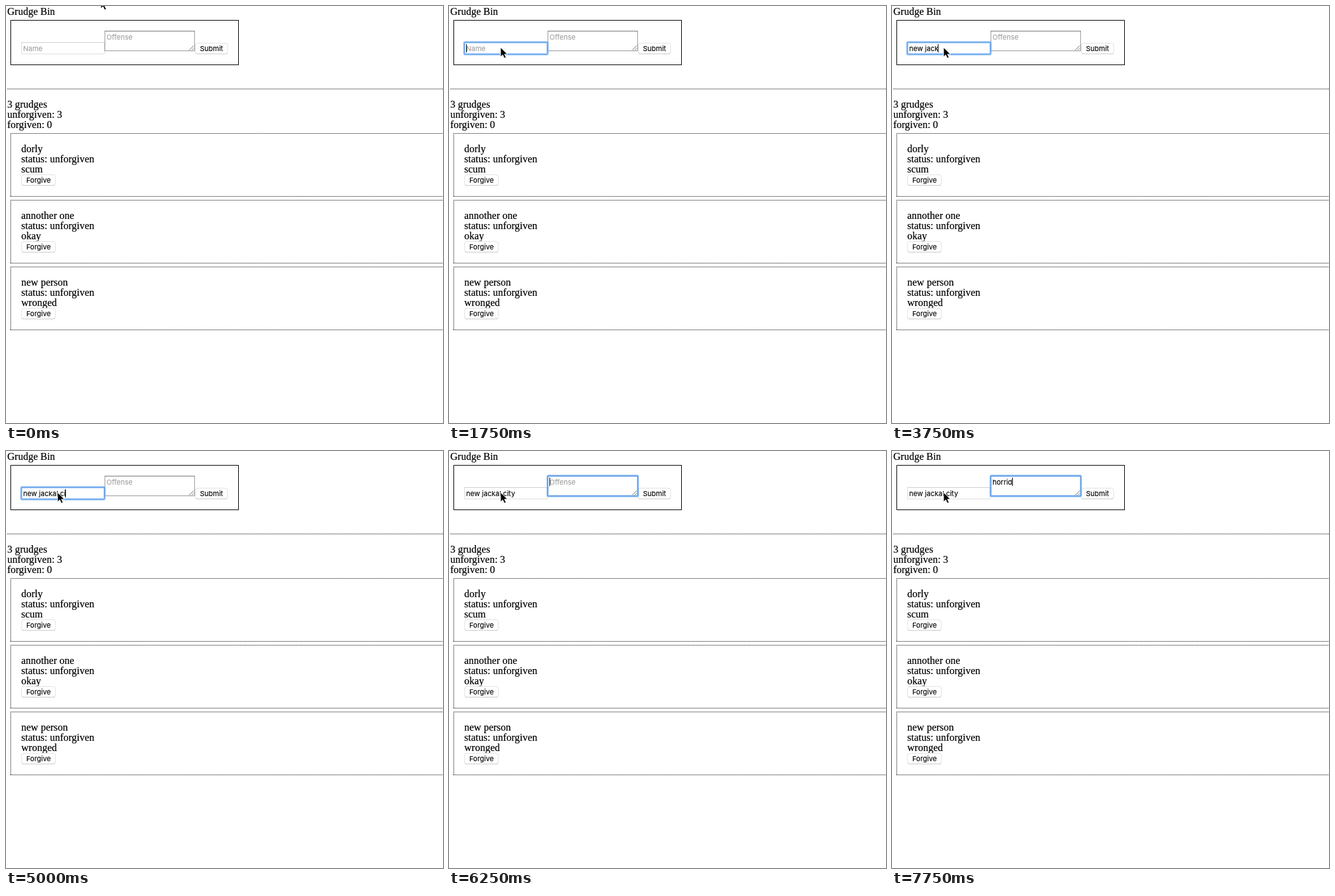
Animation, 687 px wide and 656 px high, one loop 8 s. Source, as an HTML page:

```html
<!DOCTYPE html>
<html lang="en">
<head>
<meta charset="utf-8">
<title>Grudge Bin</title>
<style>
  html, body { margin: 0; width: 100%; height: 100%; overflow: hidden; background: #fff; }
  svg { display: block; }
  text { font: 16px "Liberation Serif", Times, serif; white-space: pre; stroke: #000; stroke-width: .2px; }
  .ui { font: 11px Inter, "Liberation Sans", sans-serif; stroke-width: .1px; }
  .hint { fill: #a0a0a0; stroke: #a0a0a0; }
  .line { fill: none; stroke: #000; }
  .dots { stroke-dasharray: 1 1; }
</style>
</head>
<body>
<svg width="687" height="656" viewBox="0 0 687 656">
  <text x="2" y="14">Grudge Bin</text>
  <rect class="line" x="7.5" y="22.5" width="358" height="70"/>
  <path class="line dots" d="M2 130.5H687"/>
  <text x="2" y="160">3 grudges</text>
  <text x="2" y="176">unforgiven: 3</text>
  <text x="2" y="192">forgiven: 0</text>
  <g id="cards"></g>

  <rect x="24.5" y="57.5" width="130" height="18" fill="#fff" stroke="#dedede"/>
  <path d="M24 57.5H155" stroke="#cfcfcf"/>
  <rect x="155.5" y="39.5" width="141" height="31" fill="#fff" stroke="#989898"/>
  <path d="M155 39.5H297" stroke="#777"/>
  <path d="M288 69.5L295 62.5M292 69.5L295 66.5" stroke="#666" fill="none"/>

  <g id="ring" fill="none">
    <rect id="halo" rx="2" stroke="#6aaaf5" stroke-opacity=".4" stroke-width="4"/>
    <rect id="glow" rx="1" stroke="#5b9ff0" stroke-opacity=".7" stroke-width="2"/>
  </g>
  <text class="ui" id="name" x="27" y="71"></text>
  <text class="ui" id="offense" x="158" y="53"></text>
  <rect id="caret" width="1" height="13"/>
  <path id="cursor" d="M0 0V15.2L3.5 11.9L5.9 17.2L8.7 16L6.3 10.9H11Z"
        stroke="#fff" stroke-linejoin="round"/>
</svg>
<script>
const $ = id => document.getElementById(id);
const LOOP = 8000, STEP = 250;

const button = (x, y, w, label) => `
  <rect x="${x + .5}" y="${y + 1}" width="${w - 1}" height="17" rx="3.5" fill="#c9c9c9"/>
  <rect x="${x + .5}" y="${y + .5}" width="${w - 1}" height="16.5" rx="3.5" fill="#fff" stroke="#e2e2e2"/>
  <text class="ui" x="${x + 8}" y="${y + 13}">${label}</text>`;

const card = ([who, why], i) => {
  const y = 200 + i * 105;
  return `<path class="line dots" d="M7 ${y + .5}H687M7 ${y + 99.5}H687M7.5 ${y}V${y + 100}"/>
  <text x="24" y="${y + 30}">${who}</text>
  <text x="24" y="${y + 46}">status: unforgiven</text>
  <text x="24" y="${y + 62}">${why}</text>` + button(24, y + 65, 54, 'Forgive');
};

$('cards').innerHTML = [['dorly', 'scum'], ['annother one', 'okay'], ['new person', 'wronged']]
  .map(card).join('') + button(297, 58, 52, 'Submit');

function set(el, attrs) {
  for (const key in attrs) el.setAttribute(key, attrs[key]);
}

// Letters typed so far, one per step, with a quick double keystroke at step `skip`.
function typed(text, t, start, skip) {
  const n = Math.floor((t - start) / STEP) + 1;
  return n < 1 ? '' : text.slice(0, n + (n >= skip));
}

function field(id, value, hint) {
  $(id).textContent = value || hint;
  $(id).classList.toggle('hint', !value);
}

// The ring starts one pixel wide of the field and fades in as it settles.
function focus(id, value, [x, y, width, height], settled) {
  const out = settled ? 0 : 1;
  const box = { x: x - out, y: y - out, width: width + 2 * out, height: height + 2 * out };
  set($('halo'), box);
  set($('glow'), box);
  set($('ring'), { opacity: settled ? 1 : .65 });
  const el = $(id), advance = value ? el.getComputedTextLength() : 0;
  set($('caret'), { x: Math.floor(+el.getAttribute('x') + advance), y: el.getAttribute('y') - 11 });
}

function cursorAt(t) {
  if (t >= 1500) return [81, 65];
  const left = (1 - Math.min(t / 750, 1)) ** 2;
  return [87 + 62 * left, 65 - 76 * left].map(Math.round);
}

function draw(now) {
  const t = Math.floor(now % LOOP / STEP) * STEP;
  const name = typed('new jackal city', t, 2250, 7);
  const offense = typed('horrid', t, 6750, 5);
  field('name', name, 'Name');
  field('offense', offense, 'Offense');

  const active = t >= 1500 ? 'visible' : 'hidden';
  set($('ring'), { visibility: active });
  set($('caret'), { visibility: active });
  if (t >= 6000) focus('offense', offense, [155, 39, 142, 32], t > 6000);
  else focus('name', name, [24, 57, 131, 19], t > 1500);

  set($('cursor'), { transform: `translate(${cursorAt(t)})` });
}

function tick(now) {
  draw(now);
  requestAnimationFrame(tick);
}
draw(0);
requestAnimationFrame(tick);
</script>
</body>
</html>
```
